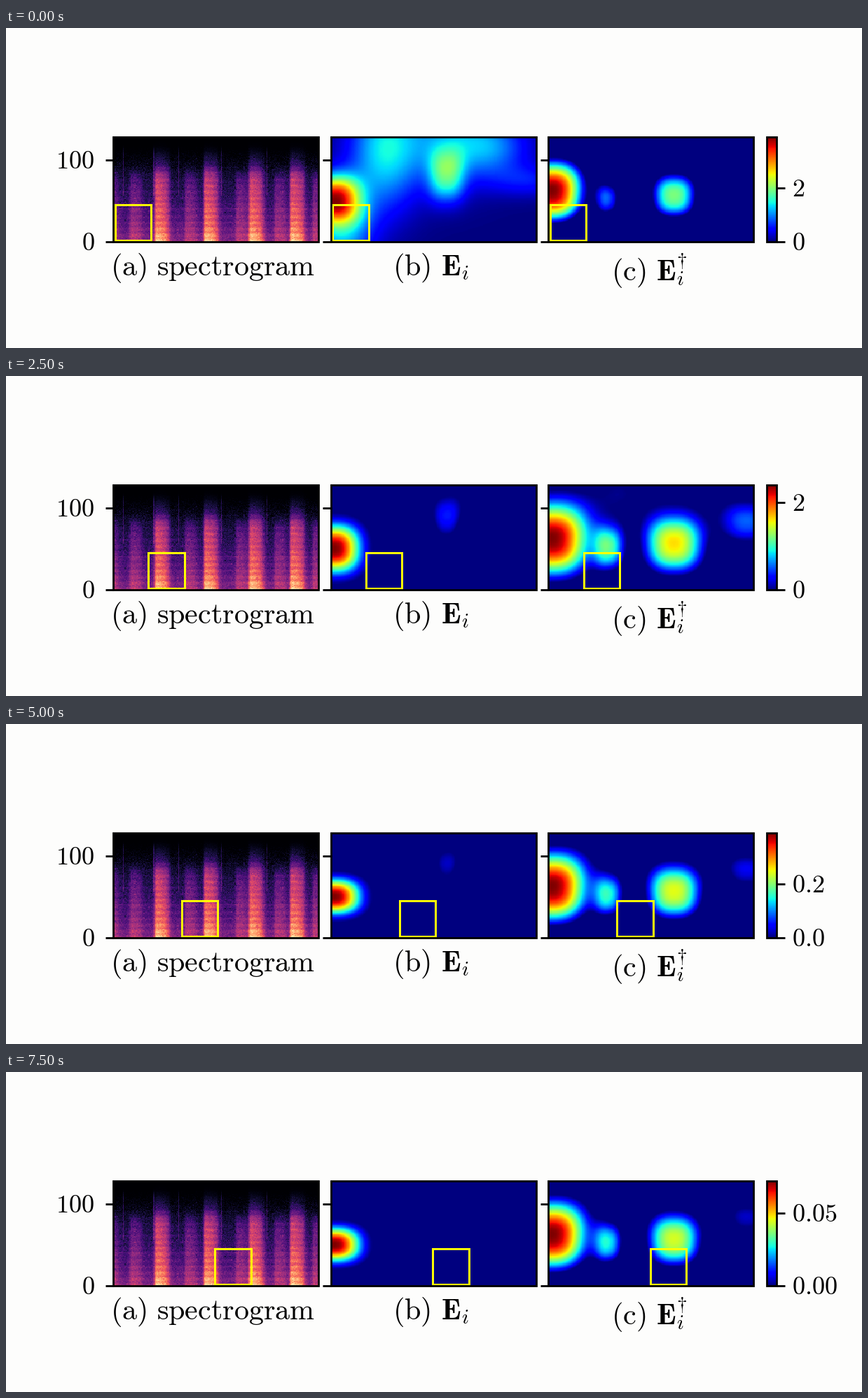
Animation, 1222 px wide and 458 px high, one loop 8 s. Source, as a matplotlib script:

```python
import numpy as np
import matplotlib.pyplot as plt
from matplotlib.animation import FuncAnimation
from matplotlib.patches import Rectangle

plt.rcParams["mathtext.fontset"] = "cm"

W, H, DPI = 1222, 458, 100
PX = 72 / DPI                      # points per pixel
TOP, BOTTOM = 156.2, 306.2
LEFTS = (153, 463.8, 774.4)
PANEL_W = 293
BAR_L, BAR_R = 1086, 1100
CAPTION, SMALL, TICK = 42.1, 29.2, 36.4

FRAMES, ROWS = 16, 3
CELLS_PER_FRAME = .6               # the window stays on a cell for 5/3 frames

# Per window cell: colour bar maximum and background level of panel (c).
BAR_MAX = (3.9, 2.7, 2.44, 2.4, 2.35, 2.3, .39, .743, 1.2, .0718)
LEVEL_C = (.52, 0, .12, .25, .28, .3, .35, .5, .4, .38)

X, Y = np.meshgrid((np.arange(250) + .5) * PANEL_W / 250,
                   (np.arange(128) + .5) * (BOTTOM - TOP) / 128)


def blob(cx, cy, sx, sy, a=1, p=2.4):
    return a * np.exp(-.5 * (np.abs((X - cx) / sx) ** p
                             + np.abs((Y - cy) / sy) ** p))


def above(field, level):
    """Keep what rises over the level, stretched back to 0..1."""
    return np.clip((field - level) / (field.max() - level), 0, 1)


FIELD_B = (blob(15, 135, 30, 45, .33, 2) + blob(75, 20, 35, 60, .36, 2)
           + blob(165, 5, 50, 45, .26, 2) + blob(230, 15, 38, 28, .22, 2)
           + blob(285, 62, 40, 16, .14, 2) + blob(165, 55, 19, 28, .38))
FIELD_C = (blob(4, 80, 42, 39) + blob(87, 91, 17, 25, .5)
           + blob(179, 86, 33, 32, .75) + blob(284, 57, 32, 24, .35)
           + blob(146, 12, 200, 35, .18, 2) + blob(100, 5, 25, 60, .08, 2))


def map_b(cell):
    level = .3 * (1 - np.exp(-1.5 * cell)) + .026 * cell
    height = 18 + 7.5 / (1 + np.exp(3 * (cell - 5)))
    rest = np.maximum(FIELD_B - level, 0)
    hot = blob(4, 91, 27.5, height)
    return above(hot + rest * (1 - .6 * hot), .07 * (cell > 0))


def map_c(cell):
    return above(FIELD_C, LEVEL_C[cell])


def spectrogram():
    rng = np.random.default_rng(4)
    x = np.arange(250)[None, :]
    h = np.arange(128)[:, None]

    def gate(x0, w):
        rise = 1 / (1 + np.exp(-(x - x0) / .8))
        fall = 1 / (1 + np.exp((x - x0 - w) / 1.6))
        return rise * fall * (1 - .35 * np.clip((x - x0) / w, 0, 1))

    def below(top, soft=4):
        return 1 / (1 + np.exp((h - top) / soft))

    v = .37 * np.exp(-h / 65) * below(92, 6)
    for x0 in (50, 110, 165, 215):
        g = gate(x0, 18)
        v = v + g * (.34 * below(87) + .14 * below(108)
                     + .14 * np.exp(-h / 9))
    for x0 in (-9, 20, 87, 149, 196, 242):
        v = v + .19 * gate(x0, 15) * below(82)
    for x0 in (12, 49, 79, 131, 187):
        v = v + .13 * (x == x0) * below(112, 2) * (h > 55)
    v = v * (1 + .07 * np.cos(2 * np.pi * h / 7.5))
    v = v + .06 * np.exp(-((h - 40) / 1.3) ** 2)
    v = v + rng.normal(0, .04, (128, 250)) * below(106)
    return np.clip(v, 0, 1)


fig = plt.figure(figsize=(W / DPI, H / DPI), dpi=DPI, facecolor="#fdfdfc")
ax = fig.add_axes([0, 0, 1, 1])
ax.axis("off")


def text(x, y, s, size, ha="left"):
    return ax.text(x, y, f"${s}$", fontsize=size * PX, ha=ha, va="baseline")


def image(data, x0, x1, cmap):
    return ax.imshow(data, cmap=cmap, vmin=0, vmax=1, aspect="auto",
                     extent=(x0, x1, BOTTOM, TOP), interpolation="nearest")


def tick(x, y):
    return ax.plot((x, x + 11.5), (y, y), color="black", lw=2.8 * PX,
                   zorder=5, solid_capstyle="butt")[0]


def outline(x, y, w, h, color, lw, z):
    return ax.add_patch(Rectangle((x, y), w, h, fill=False, ec=color,
                                  lw=lw * PX, zorder=z, joinstyle="miter"))


image(spectrogram()[::-1], LEFTS[0], LEFTS[0] + PANEL_W, "magma")
heat_b = image(map_b(0), LEFTS[1], LEFTS[1] + PANEL_W, "jet")
heat_c = image(map_c(0), LEFTS[2], LEFTS[2] + PANEL_W, "jet")
image(np.linspace(1, 0, 256)[:, None], BAR_L, BAR_R, "jet")

boxes = []
for left in LEFTS:
    outline(left, TOP, PANEL_W, BOTTOM - TOP, "black", 2.8, 6)
    tick(left - 11.5, 188.6)
    tick(left - 11.5, BOTTOM)
    boxes.append(outline(0, 0, 51.4, 50.8, "#ffff00", 3, 4))
outline(BAR_L, TOP, BAR_R - BAR_L, BOTTOM - TOP, "black", 2.8, 6)

text(126.5, 200.7, "100", TICK, "right")
text(126.5, 318.3, "0", TICK, "right")
text(149, 354, r"\mathrm{(a)\ spectrogram}", CAPTION)
for x, y, letter in ((552, 354, "b"), (863.5, 361, "c")):
    text(x, y, rf"\mathrm{{({letter})}}", CAPTION)
text(621, 354, r"\mathbf{E}", CAPTION)
text(650, 360.5, "i", SMALL)
text(928, 361, r"\mathbf{E}", CAPTION)
text(957, 368.5, "i", SMALL)
text(957, 341, r"{\dagger}", SMALL)

tick(BAR_R, BOTTOM)
bar_tick = tick(BAR_R, BOTTOM)
bar_zero = text(1122, 318.3, "0", TICK)
bar_label = text(1122, 318.3, "2", TICK)

ax.set_xlim(0, W)
ax.set_ylim(H, 0)


def update(i):
    cell = int(CELLS_PER_FRAME * i + .3)
    col, row = divmod(cell, ROWS)
    for left, box in zip(LEFTS, boxes):
        box.set_xy((left + 2.5 + 47.6 * col, 252.7 - 47.8 * row))
    heat_b.set_data(map_b(cell))
    heat_c.set_data(map_c(cell))

    top = BAR_MAX[cell]
    step = next(s for s in (2, 1, .5, .2, .1, .05) if s <= top)
    digits = 0 if step >= 1 else 1 if step >= .1 else 2
    y = BOTTOM - (BOTTOM - TOP) * step / top
    bar_tick.set_ydata((y, y))
    bar_label.set_y(y + 12.2)
    bar_label.set_text(f"${step:.{digits}f}$")
    bar_zero.set_text(f"${0:.{digits}f}$")
    return [heat_b, heat_c, bar_tick, bar_label, bar_zero, *boxes]


anim = FuncAnimation(fig, update, frames=FRAMES, interval=500,
                     repeat=True, repeat_delay=0, blit=False)
plt.show()
```
